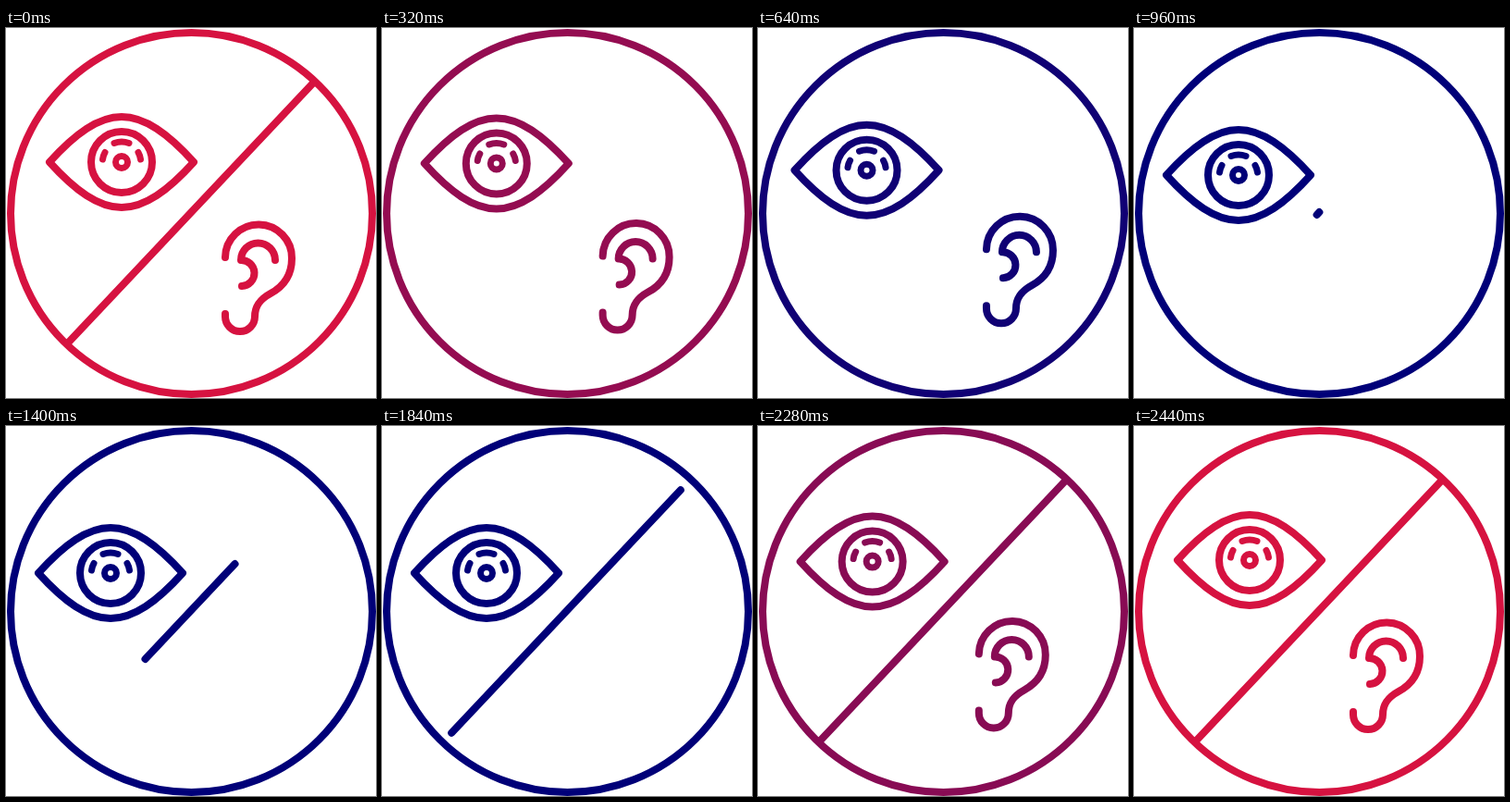
Write an HTML page that moves like this. It is 400 by 400 pixels and loops after 2.64 s.

```html
<!DOCTYPE html>
<html lang="en">
<head>
<meta charset="utf-8">
<title>Eye and ear</title>
<style>
  html, body { margin: 0; height: 100%; overflow: hidden; background: #fff; }
  svg { display: block; width: 100%; height: 100%; }
  #art { fill: none; stroke-width: 8; stroke-linecap: round; stroke-linejoin: round; }
</style>
</head>
<body>
<svg viewBox="0 0 400 400">
  <g id="art">
    <circle cx="200.5" cy="200.5" r="195.5"/>
    <path id="slash"/>
    <g id="eye">
      <path d="M47 145C75 114 100 96 125 96S175 114 203 145C175 176 150 194 125 194S75 176 47 145Z"/>
      <circle cx="125" cy="145" r="33"/>
      <circle cx="125" cy="145" r="6.5" stroke-width="7"/>
      <path stroke-width="7" d="M117 124.5Q125 121.5 133 124.5M104.5 142Q105 138 107 134.5M145.5 142Q145 138 143 134.5"/>
    </g>
    <g id="ear">
      <path d="M237 248A36 36 0 0 1 309 249C309 268 299 280 286 287C275 293 269 300 269 312A16 16 0 0 1 237 312V309"/>
      <path d="M291 251A18.5 18.5 0 0 0 254 251A14 14 0 0 1 255 279"/>
    </g>
  </g>
</svg>
<script>
const LOOP = 2640, STEP = 40;
const RED = [214, 18, 64], NAVY = [0, 0, 120];
const [art, slash, eye, ear] = ['art', 'slash', 'eye', 'ear'].map(id => document.getElementById(id));

const progress = (t, from, to) => Math.min(1, Math.max(0, (t - from) / (to - from)));
const easeIn = u => u ** 1.65;
const move = (el, x, y) => el.setAttribute('transform', `translate(${x} ${y})`);
const show = (el, on) => el.setAttribute('visibility', on ? 'visible' : 'hidden');

function draw(t) {
  // 0 = red resting pose, 1 = navy spread pose
  const tint = t < 1320 ? progress(t, 160, 680) : 1 - progress(t, 2000, 2440);
  const away = easeIn(t < 1320 ? progress(t, 160, 800) : 1 - progress(t, 1840, 2440));
  art.setAttribute('stroke', `rgb(${RED.map((c, i) => Math.round(c + (NAVY[i] - c) * tint))})`);

  move(eye, -12 * away, 14 * away);
  move(ear, 16 * away, -14 * away);
  show(ear, t < 800 || t >= 1880);

  // The slash vanishes at once, then grows from the centre
  const grow = t < 200 ? 1 : progress(t, 920, 1887) ** 1.44;
  const dx = 133 * grow, dy = 141 * grow;
  slash.setAttribute('d', `M${199 - dx} ${200.5 + dy}L${199 + dx} ${200.5 - dy}`);
  show(slash, grow > 0);
}

const start = performance.now();
function tick() {
  const t = (performance.now() - start) % LOOP;
  draw(Math.floor(t / STEP) * STEP);
  requestAnimationFrame(tick);
}
tick();
</script>
</body>
</html>
```
